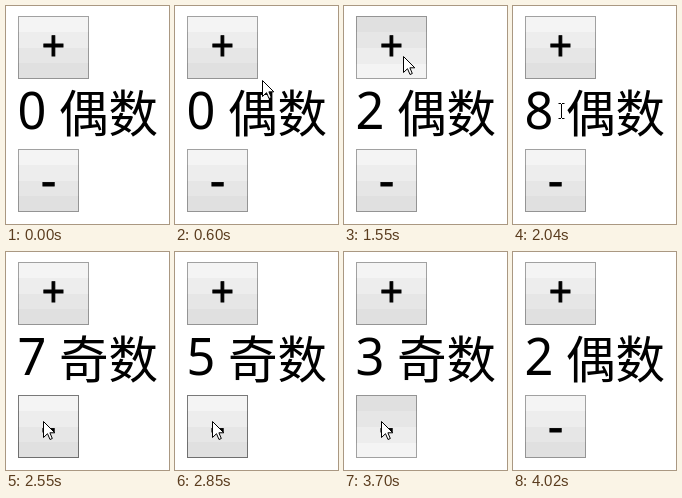
Write an HTML page with a canvas that moves like this. It is 163 px wide and 218 px high and loops after 4580 ms.

```html
<!DOCTYPE html>
<html lang="zh-CN">
<head>
<meta charset="utf-8">
<style>
html, body { margin: 0; height: 100%; overflow: hidden; background: #fff; }
canvas { display: block; }
</style>
</head>
<body>
<canvas id="stage" width="163" height="218"></canvas>
<script>
const ctx = document.getElementById('stage').getContext('2d');
const LOOP = 4580;
const plus = { x: 12, y: 10, w: 71, h: 63, label: '+', size: 41, baseline: 55, step: 2 };
const minus = { x: 12, y: 143, w: 61, h: 63, label: '-', size: 47, baseline: 191, step: -1 };
const shades = ['#f4f4f4', '#ededed', '#e6e6e6', '#e0e0e0'];

// Each click: button, time pressed, time released
const clicks = [
  [plus, 1190, 1270], [plus, 1550, 1670], [plus, 1730, 1790], [plus, 1850, 1910],
  [minus, 2370, 2450], [minus, 2560, 2640], [minus, 2760, 2850],
  [minus, 3100, 3190], [minus, 3460, 3550], [minus, 3700, 3760]
];

// Pointer stops: time, x, y
const stops = [
  [950, 60, 51], [1000, 59, 50], [1970, 54, 76], [2040, 48, 105],
  [2100, 46, 128], [2140, 41, 152], [2180, 37, 169],
  [3850, 42, 171], [3940, 58, 182], [3990, 83, 197]
];

function pointerAt(t) {
  if (t < 370 || t >= 4020) return null;
  if (t < 950) {
    const k = Math.min(10, Math.floor((t - 370) / 52)) / 10;
    const e = k * (2 - k);
    return { x: Math.round(134 - 73 * e), y: Math.round(110 - 57 * e) };
  }
  const [, x, y] = stops.filter(s => s[0] <= t).pop();
  return { x, y };
}

const inside = (p, b) => p && p.x >= b.x && p.x < b.x + b.w && p.y >= b.y && p.y < b.y + b.h;

function text(str, x, y, size, family, align = 'left') {
  ctx.font = `${size}px ${family}, sans-serif`;
  ctx.textAlign = align;
  ctx.fillStyle = '#000';
  ctx.fillText(str, x, y);
}

function drawButton(b, pointer, t) {
  const pressed = clicks.some(([button, down, up]) => button === b && t >= down && t < up);
  const hover = inside(pointer, b) && !pressed;
  const band = b.h / shades.length;
  shades.forEach((shade, i) => {
    const top = Math.round(band * (pressed ? shades.length - 1 - i : i));
    ctx.fillStyle = shade;
    ctx.fillRect(b.x, b.y + top, b.w, Math.min(16, b.h - top));
  });
  ctx.lineWidth = 1;
  ctx.strokeStyle = `rgba(0,0,0,${hover ? 0.5 : 0.34})`;
  ctx.strokeRect(b.x + 0.5, b.y + 0.5, b.w - 1, b.h - 1);

  const center = b.x + b.w / 2;
  text(b.label, center, b.baseline, b.size, '"Noto Sans"', 'center');
  ctx.lineWidth = 0.8;
  ctx.strokeStyle = '#000';
  ctx.strokeText(b.label, center, b.baseline);
}

const arrow = new Path2D('M.5 .5V16.5L4.5 12.7L7 18.5L9.3 17.5L6.9 11.8H11.8Z');
const beam = new Path2D('M-3 -7.5H-.5M.5 -7.5H3M0 -7V7M-3 7.5H-.5M.5 7.5H3');

function drawPointer({ x, y }) {
  const overText = y >= 84 && y < 126;
  ctx.save();
  ctx.translate(x + (overText ? 0.5 : 0), y);
  ctx.lineWidth = 1;
  ctx.strokeStyle = '#000';
  if (!overText) {
    ctx.fillStyle = '#fff';
    ctx.fill(arrow);
  }
  ctx.stroke(overText ? beam : arrow);
  ctx.restore();
}

function draw(now) {
  const t = now % LOOP;
  const pointer = pointerAt(t);
  const count = clicks.reduce((n, [b, , up]) => n + (t >= up ? b.step : 0), 0);
  ctx.fillStyle = '#fff';
  ctx.fillRect(0, 0, 163, 218);
  drawButton(plus, pointer, t);
  drawButton(minus, pointer, t);
  text(count, 11.5, 123, 50.5, '"Noto Sans"');
  text(count % 2 ? '奇数' : '偶数', 53, 125.5, 49.5, '"Noto Sans CJK SC", "Noto Sans CJK"');
  if (pointer) drawPointer(pointer);
}

const start = performance.now();
function tick() {
  draw(performance.now() - start);
  requestAnimationFrame(tick);
}
tick();
</script>
</body>
</html>
```
